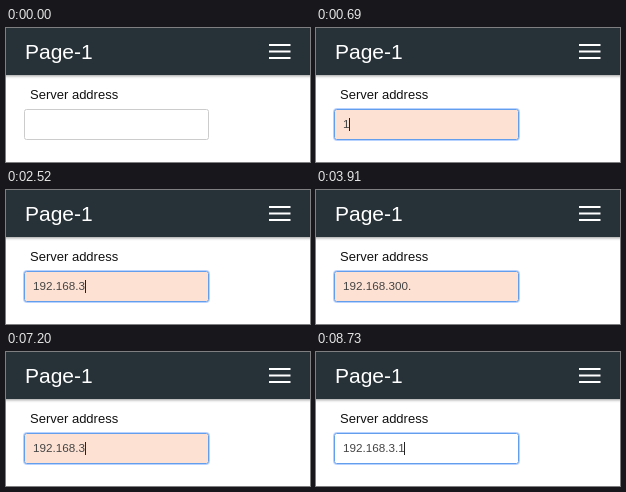
These frames come from a looping animation (304x134 px, 8.93 s). An HTML page:

```html
<!DOCTYPE html>
<html lang="en">
<head>
<meta charset="utf-8">
<title>Server address field</title>
<style>
  html, body { margin: 0; width: 100%; height: 100%; overflow: hidden; background: #fff; }
  svg { display: block; font-family: "Liberation Sans", Arial, sans-serif; }
  .bar { filter: drop-shadow(0 1px 1.5px rgba(0, 0, 0, .4)); }
</style>
</head>
<body>
<svg width="304" height="134" viewBox="0 0 304 134">
  <rect class="bar" x="-5" y="-5" width="314" height="52" fill="#263238"/>
  <text x="19" y="31" font-size="21" fill="#fff">Page-1</text>
  <path d="M263 17h21.5M263 23.5h21.5M263 30h21.5" stroke="#fff" stroke-width="1.8"/>
  <text x="24" y="71" font-size="13" fill="#111">Server address</text>
  <rect id="glow" x="17.5" y="80.5" width="186" height="32" rx="3" fill="none" stroke="#4d90fe" stroke-opacity=".4"/>
  <rect id="field" x="18.5" y="81.5" width="184" height="30" rx="2"/>
  <text id="value" x="27" y="100" font-size="11.7" fill="#444"></text>
  <rect id="caret" y="90" width="1" height="13" fill="#222"/>
</svg>
<script>
const LOOP = 8930;
const FOCUS = 70, INVALID = 480, VALID = 8000;

// [time, key]: '<' deletes, '' toggles the caret
const keys = [
  [480, '1'], [820, '9'], [950, '2'], [1080, '.'], [1280, '1'],
  [1540, '6'], [1670, '8'], [2060, ''], [2190, '.'], [2520, '3'],
  [2850, '0'], [3050, '0'], [3450, '.'], [3910, ''], [4170, '1'],
  [4500, '2'], [4630, '2'], [5030, ''], [5490, ''], [5890, ''],
  [6220, '<'], [6380, '<'], [6550, '<'], [6750, '<'], [6950, '<'], [7200, '<'],
  [7600, '.'], [8000, '1'], [8400, ''], [8730, '']
];

const [glow, field, value, caret] =
  ['glow', 'field', 'value', 'caret'].map(id => document.getElementById(id));

const mix = (a, b, p) => `rgb(${a.map((v, i) => Math.round(v + (b[i] - v) * p))})`;

// Fades advance in visible steps of 70 ms
const fade = (t, start, length) => {
  const p = Math.floor((t - start) / 70) * 70 / length;
  const c = Math.min(1, Math.max(0, p));
  return c * c * (3 - 2 * c);
};
const easeOut = p => 1 - (1 - p) ** 1.5;

function typed(t) {
  let text = '', on = t >= FOCUS;
  for (const [time, key] of keys) {
    if (time > t) break;
    on = key ? true : !on;
    text = key === '<' ? text.slice(0, -1) : text + key;
  }
  return { text, on };
}

function draw(t) {
  const focus = fade(t, FOCUS - 70, 210);
  const pink = easeOut(fade(t, INVALID, 200)) - easeOut(fade(t, VALID, 200));
  glow.setAttribute('opacity', focus);
  field.setAttribute('stroke', mix([204, 204, 204], [98, 158, 236], focus));
  field.setAttribute('fill', mix([255, 255, 255], [253, 226, 212], pink));

  const { text, on } = typed(t);
  value.textContent = text;
  const width = text ? value.getComputedTextLength() : 0;
  caret.setAttribute('x', Math.floor(27 + width));
  caret.setAttribute('visibility', on ? 'visible' : 'hidden');
}

function tick() {
  draw(performance.now() % LOOP);
  requestAnimationFrame(tick);
}
tick();
</script>
</body>
</html>
```
